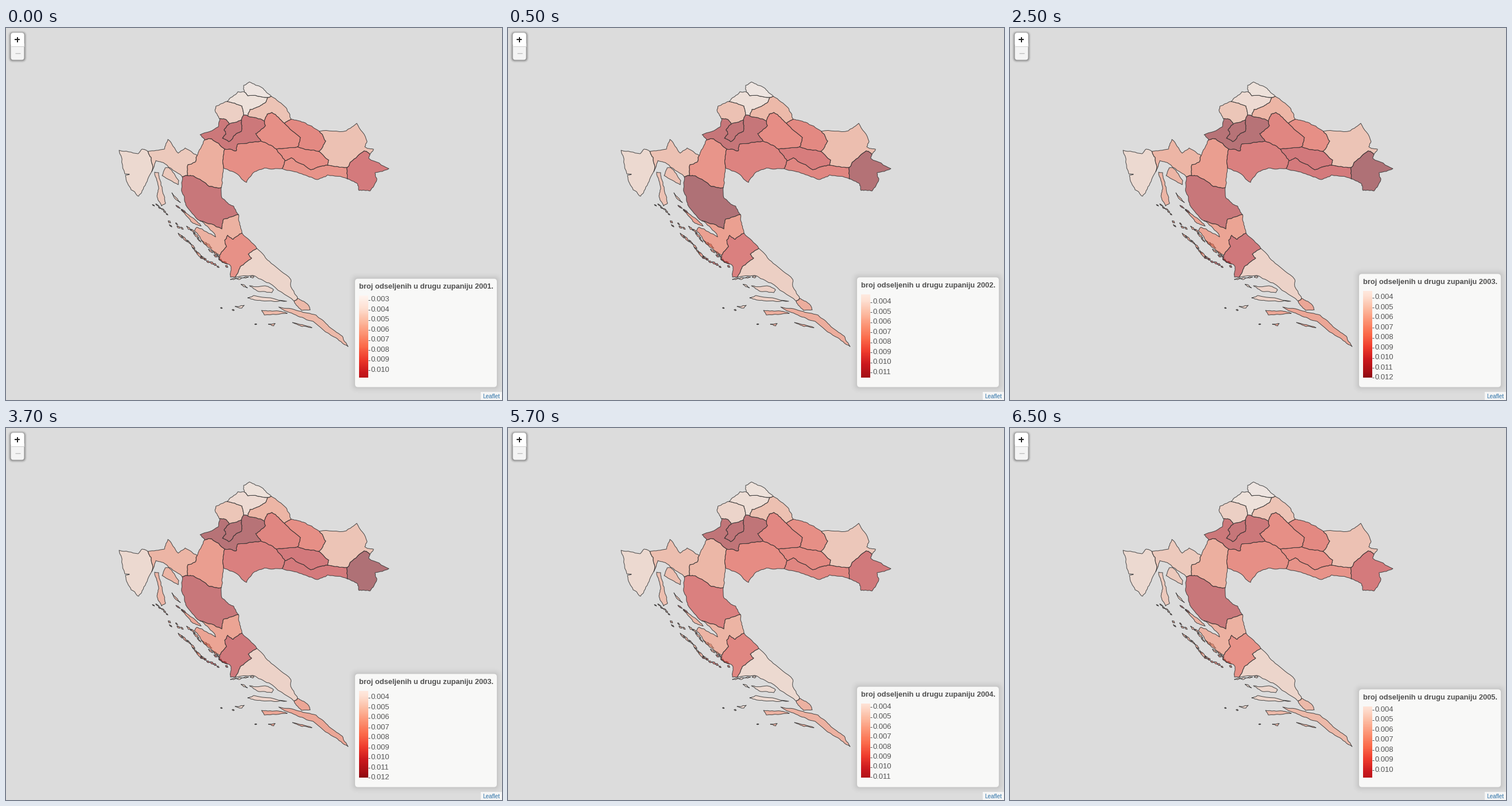
A matplotlib script that plays this animation: 864x648 px, repeating every 8000 ms.

```python
import numpy as np
import matplotlib
import matplotlib.pyplot as plt
from matplotlib.animation import FuncAnimation
from matplotlib.patches import FancyBboxPatch, Rectangle

W, H, DPI = 864, 648, 100
PX = 72 / DPI
REDS = matplotlib.colormaps["Reds"]

fig = plt.figure(figsize=(W / DPI, H / DPI), dpi=DPI, facecolor="#dcdcdc")
ax = fig.add_axes([0, 0, 1, 1])
ax.axis("off")


# ---------- geometry ----------
def rough(xy, amount=0.3):
    """Turn a few key points into a jagged coast by midpoint displacement."""
    pts = np.array(xy, float).reshape(-1, 2)
    rng = np.random.default_rng(int(pts.sum()))
    for _ in range(3):
        step = np.diff(pts, axis=0)
        size = np.hypot(*step.T)[:, None]
        shift = rng.uniform(-amount, amount, size.shape) / np.sqrt(size + 1e-6)
        out = np.empty((2 * len(pts) - 1, 2))
        out[::2] = pts
        out[1::2] = pts[:-1] + step / 2 + step[:, ::-1] * [1, -1] * shift
        pts = out
    return pts


arcs, islands = {}, {}


def border(sides, *xy):
    """Line shared by one or two regions."""
    line = rough(xy)
    for name in sides.split():
        arcs.setdefault(name, []).append(line)


def island(name, *xy, amount=0.25):
    islands.setdefault(name, []).append(rough(xy + xy[:2], amount))


def archipelago(name, x0, y0, x1, y1, count, length, spread=3):
    """Slim islands scattered along a line and pointing along it."""
    rng = np.random.default_rng(x0 + y1)
    along = np.array([x1 - x0, y1 - y0]) / np.hypot(x1 - x0, y1 - y0)
    across = along[::-1] * [1, -1]
    for t in (np.arange(count) + 0.5) / count:
        center = [x0 + t * (x1 - x0), y0 + t * (y1 - y0)] + across * rng.uniform(-spread, spread)
        half = along * length * rng.uniform(0.35, 0.65)
        side = across * rng.uniform(0.8, 1.8)
        island(name, *np.concatenate([center - half, center + side, center + half, center - side]))


def outline(name):
    """Chain the borders of a region end to end."""
    rest = list(arcs[name])
    path = rest.pop(0)
    while rest:
        _, i, k = min((np.hypot(*(line[k] - path[-1])), i, k)
                      for i, line in enumerate(rest) for k in (0, -1))
        line = rest.pop(i)
        path = np.vstack([path, line if k == 0 else line[::-1]])
    return path


# north-west
border("med", 415, 111, 414, 100, 424, 94, 446, 104, 462, 119)
border("med var", 415, 111, 421, 118, 456, 121)
border("med kop", 456, 121, 462, 119)
border("var", 415, 111, 404, 111, 385, 128)
border("var kra", 385, 128, 411, 136, 414, 151)
border("var zag", 414, 151, 421, 153)
border("var kop", 456, 121, 452, 130, 435, 139, 425, 142, 421, 153)
border("kra", 385, 128, 366, 136, 364, 143, 372, 158)
border("kra zag", 372, 158, 382, 159, 389, 167)
border("kra cit", 389, 167, 410, 160)
border("kra zag", 410, 160, 414, 151)
border("cit zag", 389, 167, 380, 177, 383, 185, 377, 192, 388, 198, 401, 184, 410, 180, 410, 160)
border("kop zag", 421, 153, 450, 162)
border("kop", 462, 119, 488, 139, 497, 159)
border("kop bje", 450, 162, 455, 150, 463, 147, 485, 166)
border("kop vir", 485, 166, 497, 159)
border("zag", 372, 158, 370, 172, 338, 186, 346, 195)
border("zag kar", 346, 195, 358, 193, 381, 211)
border("zag sis", 381, 211, 401, 214, 404, 202, 444, 197)
border("zag bje", 450, 162, 452, 170, 435, 184, 444, 197)

# Slavonia
border("bje vir", 485, 166, 513, 191, 508, 207)
border("bje poz", 508, 207, 471, 211)
border("bje sis", 444, 197, 471, 211)
border("vir", 497, 159, 518, 164, 546, 180)
border("vir osi", 546, 180, 557, 197, 545, 215)
border("vir poz", 508, 207, 545, 215)
border("osi poz", 545, 215, 562, 230, 560, 239)
border("osi bro", 560, 239, 594, 243)
border("osi vuk", 594, 243, 601, 233, 624, 214, 634, 220)
border("osi", 546, 180, 593, 179, 611, 166, 629, 198, 625, 207, 640, 211, 634, 220)
border("vuk", 634, 220, 632, 227, 667, 245, 643, 252, 646, 264, 634, 284, 615, 283, 612, 271, 595, 263)
border("vuk bro", 594, 243, 595, 263)
border("bro poz", 486, 231, 497, 226, 531, 247, 545, 242, 560, 239)
border("bro", 595, 263, 560, 256, 542, 264, 515, 254, 481, 245)
border("bro sis", 486, 231, 481, 245)
border("poz sis", 471, 211, 486, 231)
border("sis", 481, 245, 450, 244, 434, 250, 419, 269, 397, 251, 379, 244)
border("sis kar", 381, 211, 379, 244)

# Kvarner, Istria and Lika
border("kar", 379, 244, 377, 269, 375, 278)
border("kar", 346, 195, 337, 212, 333, 222)
border("kar pri", 333, 222, 330, 233, 317, 238, 316, 257)
border("kar lik", 316, 257, 327, 258, 354, 276, 375, 278)
border("pri", 247, 215, 276, 211, 282, 194, 300, 218, 312, 209, 333, 222)
border("pri ist", 247, 215, 253, 226, 254, 250)
border("pri", 254, 250, 261, 231, 276, 236, 307, 259)
border("pri lik", 307, 259, 316, 257)
border("ist", 247, 215, 237, 211, 230, 219, 197, 213, 207, 254, 215, 255, 208, 257,
       218, 282, 231, 293, 240, 277, 254, 250)
border("lik", 307, 259, 307, 287, 313, 308, 338, 336)
border("lik", 375, 278, 377, 297, 396, 310, 405, 325)
border("lik zad", 338, 336, 376, 350, 379, 333, 405, 325)

# Dalmatia
border("zad", 405, 325, 405, 334, 411, 357)
border("zad sib", 411, 357, 396, 368, 386, 361, 381, 370, 384, 381, 372, 396)
border("zad", 338, 336, 362, 357, 365, 364, 333, 347, 328, 353, 345, 376, 372, 396)
border("sib", 411, 357, 437, 384)
border("sib spl", 437, 384, 422, 394, 428, 401, 408, 416, 399, 434)
border("sib", 372, 396, 371, 403, 391, 414, 391, 434, 399, 434)
border("spl", 437, 384, 462, 410, 496, 438, 497, 452, 508, 471)
border("spl dub", 508, 471, 502, 476)
border("spl", 502, 476, 458, 444, 430, 431, 399, 434)
border("dub", 508, 471, 524, 480, 530, 491, 515, 492, 502, 476)

# islands
island("dub", 475, 486, 510, 493, 540, 500, 560, 517, 586, 537, 596, 555, 571, 538, 535, 511, 505, 500)
island("dub", 445, 492, 475, 493, 490, 497, 450, 500)
island("dub", 499, 513, 533, 522, 516, 520)
island("dub", 457, 516, 469, 515, 466, 519)
island("spl", 424, 449, 455, 450, 466, 456, 463, 461, 440, 459)
island("spl", 421, 470, 432, 466, 489, 476, 445, 475)
island("spl", 399, 485, 415, 483, 411, 488)
island("pri", 259, 251, 266, 252, 270, 271, 273, 286, 278, 305, 271, 310, 263, 292, 266, 280)
island("pri", 272, 257, 277, 244, 283, 243, 301, 266, 300, 273)
island("pri", 289, 287, 304, 304, 294, 297)
island("zad", 305, 317, 326, 331, 340, 345, 322, 337)
archipelago("pri", 256, 305, 284, 324, 6, 6)
archipelago("lik", 295, 308, 314, 323, 2, 9, 1)
archipelago("zad", 283, 335, 306, 354, 5, 7, 5)
archipelago("zad", 302, 357, 346, 404, 7, 12, 2)
archipelago("zad", 315, 346, 368, 396, 8, 13, 3)
archipelago("sib", 338, 398, 372, 418, 6, 6, 2)
archipelago("sib", 362, 396, 388, 415, 6, 7)
archipelago("spl", 391, 438, 434, 432, 4, 9, 1)
archipelago("spl", 409, 446, 421, 453, 1, 12, 0)
archipelago("spl", 365, 486, 406, 493, 2, 3, 0)
archipelago("dub", 430, 516, 440, 516, 1, 3, 0)

# migration level in percent of the scale: mean, sine and cosine part of its four-year wave
WAVES = dict(
    ist=(16, 0, 0), pri=(32, -1, -6), kar=(47, 10, -5), lik=(82, 12, 0), zad=(45, 6, -4),
    sib=(68, 2, -9), spl=(19, 3, -1), dub=(42, 1, -6), zag=(85, -2, -6), cit=(87, -1, -4),
    kra=(25, 6, -3), var=(12, -1, -3), med=(7, -2, -2), kop=(34, 2, -4), bje=(63, -2, -3),
    vir=(62, 2, 2), osi=(30, 3, 1), vuk=(84, 8, -10), bro=(66, 0, -8), poz=(68, 4, -7),
    sis=(65, 3, -5),
)


def level(name, year):
    mean, sine, cosine = WAVES[name]
    angle = np.pi * year / 2
    return (mean + sine * np.sin(angle) + cosine * np.cos(angle)) / 100


shapes = {}
for name in WAVES:
    loops = islands.get(name, []) + ([outline(name)] if name in arcs else [])
    shapes[name] = [ax.fill(*p.T, ec=(.22, .22, .22, .9), lw=PX, joinstyle="round")[0] for p in loops]


# ---------- interface ----------
def box(x, y, w, h, radius, color, alpha=1.0, z=5):
    style = f"round,pad=0,rounding_size={radius}"
    return ax.add_patch(FancyBboxPatch((x, y), w, h, boxstyle=style, fc=color, ec="none", alpha=alpha, zorder=z))


def label(x, y, text, size, color, **kw):
    return ax.text(x, y, text, fontsize=size * PX, color=color, family="Liberation Sans",
                   va="baseline", zorder=9, **kw)


def stroke(x0, y0, x1, y1, color, width):
    return ax.plot([x0, x1], [y0, y1], color=color, lw=width * PX, solid_capstyle="butt", zorder=8)[0]


for d in range(5, 0, -1):
    box(8.5 - d, 9.5 - d, 23 + 2 * d, 46 + 2 * d, 4 + d, "black", 0.03 + 0.025 * (5 - d))
box(8.5, 8.5, 23, 47, 4, "#f4f4f4", z=6)
box(8.5, 8.5, 23, 23, 4, "white", z=6)
ax.add_patch(Rectangle((8.5, 27), 23, 4.5, fc="white", zorder=6))
stroke(8.5, 31.5, 31.5, 31.5, "#cccccc", 1)
stroke(15, 20, 24, 20, "#222222", 2)
stroke(19.5, 15.5, 19.5, 24.5, "#222222", 2)
stroke(15.5, 43.5, 24.5, 43.5, "#bbbbbb", 1.3)

ax.add_patch(Rectangle((826.5, 634), 38, 14, fc="#f5f5f5", zorder=6))
label(830.5, 645, "Leaflet", 10, "#2f73a8")

# ---------- legend ----------
STEP, BAR_END, PANEL_END = 17.45, 609.5, 625.5
LOWEST = (2.65, 3.28, 3.4, 3.74, 3.71)
HIGHEST = (10.8, 11.57, 12.03, 11.09, 10.8)
shadow = [(d, box(0, 0, 1, 1, 5 + d, "black", 0.013 * (1 - d / 13))) for d in range(12, 0, -1)]
panel = box(0, 0, 1, 1, 5, "#f8f8f7", z=6)
title = label(615, 0, "", 12.85, "#505050", weight="bold")
bar = ax.imshow(np.zeros((2, 1, 3)), aspect="auto", interpolation="nearest", zorder=7)
marks = {v: (label(635.5, 0, f"{v / 1000:.3f}", 13, "#555555"), stroke(631, 0, 634, 0, "#555555", 1))
         for v in range(3, 13)}
ax.set(xlim=(0, W), ylim=(H, 0))


def draw(i):
    year = (i + 3) // 4
    for name, patches in shapes.items():
        for patch in patches:
            patch.set_facecolor(REDS(level(name, year), alpha=0.5))

    low, high = LOWEST[year], HIGHEST[year]
    start = BAR_END - (high - low) * STEP
    top = start - 30.5
    for d, patch in [(0, panel)] + shadow:
        patch.set_bounds(608 - d, top - d, 247 + 2 * d, PANEL_END - top + 2 * d)
    title.set_text(f"broj odseljenih u drugu zupaniju {2001 + year}.")
    title.set_y(top + 17.5)

    shades = (np.linspace(low, high, 150) - 2.6) / 10.2
    bar.set_data(REDS(shades)[:, None, :3])
    bar.set_extent((615, 631, BAR_END, start))
    for value, (text, tick) in marks.items():
        y = BAR_END - (high - value) * STEP
        text.set_y(y + 3)
        tick.set_ydata([y + 0.5, y + 0.5])
        for artist in (text, tick):
            artist.set_visible(low < value < high)
    return []


anim = FuncAnimation(fig, draw, frames=16, interval=500, repeat=True, repeat_delay=0)
plt.show()
```
